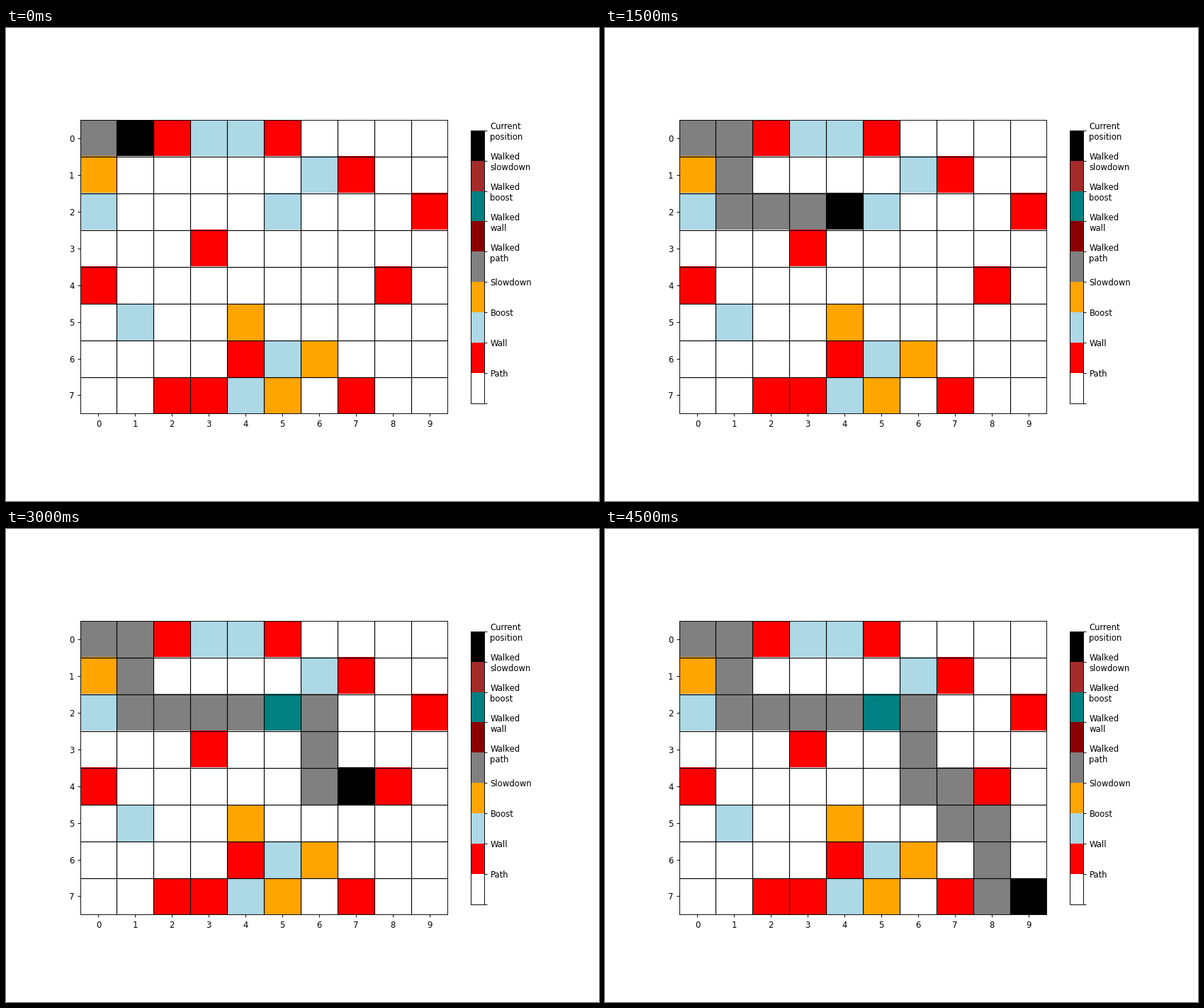
Animation of 837 by 669 pixels, one loop 4.8 s. Source, as a matplotlib script:

```python
import numpy as np
import matplotlib.pyplot as plt
from matplotlib.animation import FuncAnimation
from matplotlib.cm import ScalarMappable
from matplotlib.colors import BoundaryNorm, ListedColormap

W, H, DPI = 837, 669, 83.625
CELL = 51.894          # cell side in pixels
CENTER_Y = 0.495 * H   # vertical middle of grid and colorbar

COLORS = ["white", "red", "lightblue", "orange", "gray",
          "darkred", "teal", "brown", "black"]
LABELS = ["", "Path", "Wall", "Boost", "Slowdown", "Walked\npath",
          "Walked\nwall", "Walked\nboost", "Walked\nslowdown",
          "Current\nposition"]
WALKED, CURRENT = 4, 8

BOARD = np.array([[int(c) for c in row] for row in (
    "0012210000",
    "3000002100",
    "2000020001",
    "0001000000",
    "1000000010",
    "0200300000",
    "0000123000",
    "0011230100",
)])
ROWS, COLS = BOARD.shape
MOVES = "RDDRRRRRDDRDRDDR"


def walk(moves):
    row, col = 0, 0
    cells = [(row, col)]
    for move in moves:
        row, col = row + (move == "D"), col + (move == "R")
        cells.append((row, col))
    return cells


PATH = walk(MOVES)


def board_at(step):
    state = BOARD.copy()
    for cell in PATH[:step + 1]:
        state[cell] += WALKED
    state[PATH[step + 1]] = CURRENT
    return state


def add_axes(left, width, height):
    bottom = CENTER_Y - height / 2
    return fig.add_axes([left / W, bottom / H, width / W, height / H])


fig = plt.figure(figsize=(10.009, 8), dpi=DPI, facecolor="white")
cmap = ListedColormap(COLORS)
norm = BoundaryNorm(np.arange(len(COLORS) + 1), len(COLORS))

ax = add_axes(104.55, COLS * CELL, ROWS * CELL)
x_edges = np.arange(COLS + 1) - 0.5
y_edges = np.arange(ROWS + 1) - 0.5
y_edges[1:5] -= 1 / CELL  # upper rows sit one pixel above their grid lines
mesh = ax.pcolormesh(x_edges, y_edges, board_at(0), cmap=cmap, norm=norm)

ax.set_xlim(-0.5, COLS - 0.5)
ax.set_ylim(ROWS - 0.5, -0.5)
ax.set_xticks(range(COLS))
ax.set_yticks(range(ROWS))
ax.set_xticks(np.arange(1, COLS) - 0.5, minor=True)
ax.set_yticks(np.arange(1, ROWS) - 0.5, minor=True)
ax.tick_params(which="minor", length=0)
ax.grid(which="minor", color="black", linestyle="-", linewidth=1)

bar_height = 0.75 * 0.77 * H
bar_axes = add_axes(656.0, bar_height / 20, bar_height)
bar = fig.colorbar(ScalarMappable(norm=norm, cmap=cmap), cax=bar_axes)
bar.set_ticks(range(len(LABELS)), labels=LABELS)


def update(step):
    mesh.set_array(board_at(step))
    return [mesh]


anim = FuncAnimation(fig, update, frames=len(MOVES), interval=300,
                     repeat=True, repeat_delay=0, blit=False)
plt.show()
```
